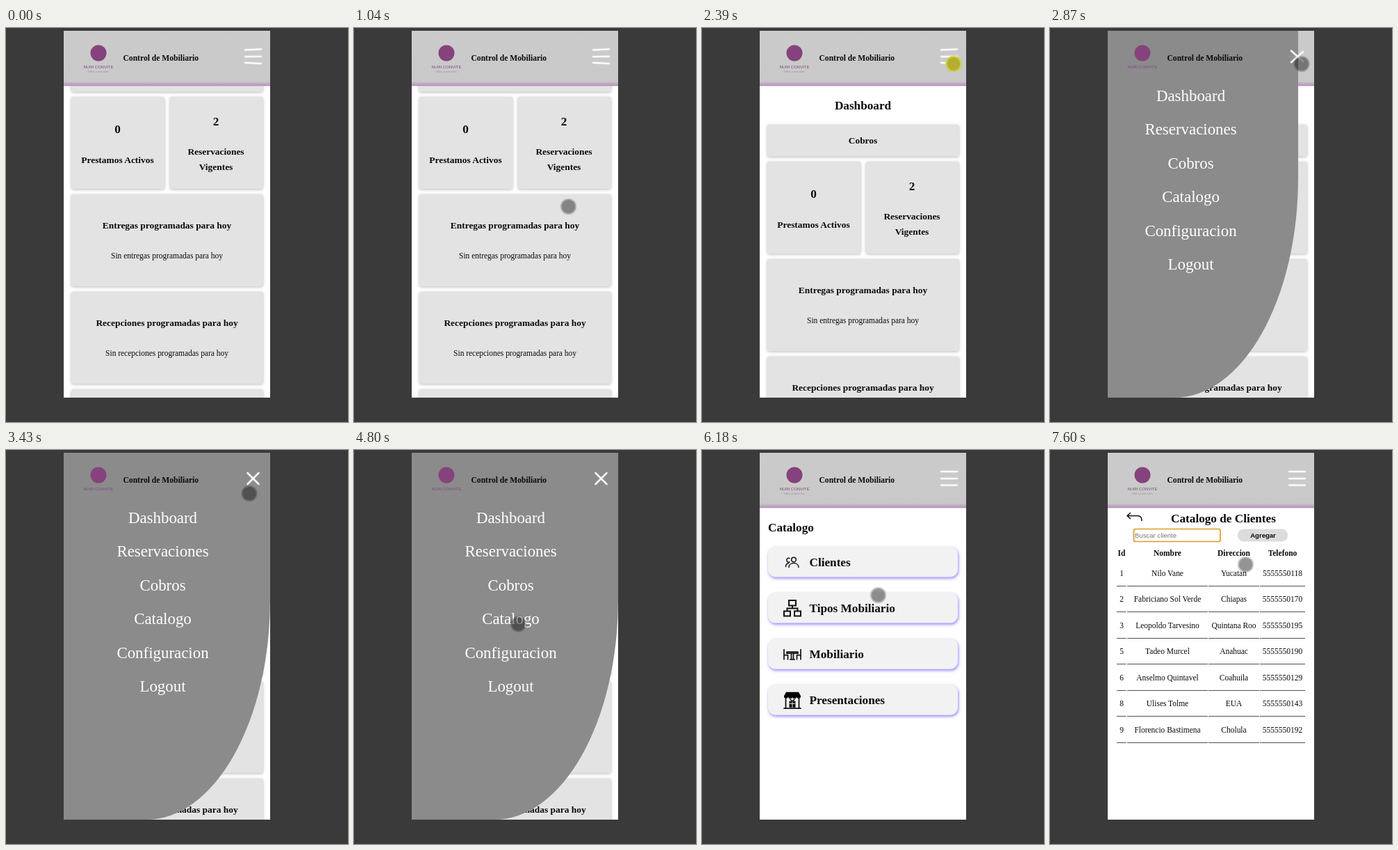
Write an HTML page that moves like this. It is 492 px wide and 566 px high and loops after 8 s.

```html
<!DOCTYPE html>
<html lang="es">
<head>
<meta charset="utf-8">
<title>Control de Mobiliario</title>
<style>
  html, body { margin: 0; width: 100%; height: 100%; overflow: hidden; background: #3a3a3a; }
  svg { display: block; width: 492px; height: 566px; font: 11.46px "Liberation Serif", serif; }
  text { fill: #0a0a0a; text-anchor: middle; }
  .left { text-anchor: start; }
  .b { font-weight: bold; }
  .h2 { font-weight: bold; font-size: 17.2px; }
  .h3 { font-weight: bold; font-size: 13.41px; }
  .link { font-size: 22.9px; fill: #fff; }
  .ui { font-family: "Liberation Sans", sans-serif; font-size: 9.55px; }
  .card { fill: #e3e3e3; filter: drop-shadow(0 1px 2px rgba(0, 0, 0, .28)); }
  .item { fill: #f2f2f2; filter: drop-shadow(1.5px 2px 2px rgba(75, 62, 255, .62)); }
  .line { fill: none; stroke: #111; stroke-width: 1.5; stroke-linecap: round; stroke-linejoin: round; }
  .bar { stroke: #fff; stroke-width: 2.7; stroke-linecap: round; }
</style>
</head>
<body>
<svg viewBox="0 0 492 566">
  <defs>
    <clipPath id="phone"><rect x="83" y="4" width="297" height="527"/></clipPath>
    <linearGradient id="bg" x1="0" y1="0" x2="0" y2="1">
      <stop offset="0" stop-color="#cbcbcb"/>
      <stop offset=".92" stop-color="#c9c9c9"/>
      <stop offset=".965" stop-color="#bda9c0"/>
      <stop offset="1" stop-color="#b592ba"/>
    </linearGradient>
  </defs>
  <rect width="492" height="566" fill="#3a3a3a"/>
  <g clip-path="url(#phone)">
    <rect x="83" y="4" width="297" height="527" fill="#fff"/>
    <g id="dash"><g id="scroll"></g></g>
    <g id="catalog"></g>
    <g id="clients"></g>
    <rect x="83" y="4" width="297" height="79" fill="url(#bg)"/>
    <rect x="83" y="83" width="297" height="1" fill="#b592ba" opacity=".35"/>
    <g id="menu">
      <path d="M83 4H380V215A178 316 0 0 1 202 531H83Z" fill="#8b8b8b"/>
    </g>
    <circle cx="133" cy="36" r="11.5" fill="#86427c"/>
    <text class="ui" x="133" y="58" style="font-size:6px;fill:#7c4a80">NURI CONVITE</text>
    <text class="ui" x="133" y="63.5" style="font-size:4px;fill:#a08aa4">Sillas y manteles</text>
    <text class="b" x="168.5" y="47" style="text-anchor:start;font-size:11.6px">Control de Mobiliario</text>
    <path id="top" class="bar" d="M-11.3 0H11.3"/>
    <path id="mid" class="bar" d="M-11.3 0H11.3"/>
    <path id="low" class="bar" d="M-11.3 0H11.3"/>
  </g>
  <g id="cursor">
    <g id="plain">
      <circle r="11.6" opacity=".22"/>
      <circle r="9.8" opacity=".26"/>
    </g>
    <g id="press">
      <circle r="11.8" fill="#d0cf48" opacity=".95"/>
      <circle r="9.4" fill="#b3b031"/>
    </g>
  </g>
</svg>
<script>
const LOOP = 8000;
const $ = id => document.getElementById(id);
const add = (id, ...parts) => $(id).insertAdjacentHTML('beforeend', parts.join(''));
const text = (cls, x, y, s) => `<text class="${cls}" x="${x}" y="${y}">${s}</text>`;
const rect = (cls, x, y, w, h, r) =>
  `<rect class="${cls}" x="${x}" y="${y}" width="${w}" height="${h}" rx="${r}"/>`;
const card = (x, y, w, h) => rect('card', x, y, w, h, 2);

// Dashboard
add('scroll',
  text('h2', 231.5, 117, 'Dashboard'),
  card(94, 139, 275.5, 45.5), text('h3', 231.5, 166, 'Cobros'),
  card(94, 192, 134, 132), text('h2', 160.5, 243.5, '0'),
  text('h3', 160.5, 286.5, 'Prestamos Activos'),
  card(236, 192, 133.5, 132), text('h2', 302, 232.5, '2'),
  text('h3', 302, 275, 'Reservaciones'), text('h3', 302, 297, 'Vigentes'),
  card(94, 332, 275.5, 132), text('h3', 231.5, 381, 'Entregas programadas para hoy'),
  text('', 231.5, 424, 'Sin entregas programadas para hoy'),
  card(94, 472, 275.5, 132), text('h3', 231.5, 521, 'Recepciones programadas para hoy'),
  text('', 231.5, 563.5, 'Sin recepciones programadas para hoy'),
  card(94, 612, 275.5, 132));

// Menu
['Dashboard', 'Reservaciones', 'Cobros', 'Catalogo', 'Configuracion', 'Logout']
  .forEach((s, i) => add('menu', text('link', 225.5, 105 + 48.4 * i, s)));

// Catalog, icons drawn around their centre
const icons = [
  `<g class="line"><circle cx="2" cy="-4" r="3.3"/><path d="M-5 7C-5-1 9-1 9 7M-4-6A3 3 0 1 0-4-0.5M-9.5 6C-9.5 3-8 1.5-5.5 1.2"/></g>`,
  `<path class="line" style="stroke-width:2;stroke-linecap:butt;stroke-linejoin:miter"
    d="M-5-11.5H5V-4H-5ZM-12 4H-3V11H-12ZM3 4H12V11H3ZM0-4V0M-7.5 4V0H7.5V4"/>`,
  `<path class="line" style="stroke-width:1.7"
    d="M-8-3.5H8V-1.5H-8ZM-1.5-1V7M1.5-1V7M-3 7.2H3M-12-7V7M-12 1H-6.5V7M12-7V7M12 1H6.5V7"/>`,
  `<path d="M-9-12H9L12-6.5A3 3 0 0 1 6-5.5A3 3 0 0 1 0-5.5A3 3 0 0 1-6-5.5A3 3 0 0 1-12-6.5Z"/>
   <path class="line" style="stroke-width:1.8" d="M-9.5-4V11M9.5-4V11M-12 11.3H12"/>
   <path d="M-4.5 1H4.5V10H-4.5Z"/><path d="M0 1V10M-4.5 4.5H4.5" stroke="#f2f2f2"/>
   <path class="line" d="M0 1L-3-1.5M0 1L3-1.5"/>`
];
add('catalog', text('h2 left', 95, 117, 'Catalogo'));
['Clientes', 'Tipos Mobiliario', 'Mobiliario', 'Presentaciones'].forEach((s, i) => {
  const y = 139 + 66.1 * i;
  add('catalog', rect('item', 95, y, 273, 43.5, 11),
    `<g transform="translate(130 ${y + 22.5})">${icons[i]}</g>`,
    text('h2 left', 154.5, y + 28, s));
});

// Client list
const cols = [103, 169, 264.5, 334.5];
const people = [
  [1, 'Nilo Vane', 'Yucatan', '18'],
  [2, 'Fabriciano Sol Verde', 'Chiapas', '70'],
  [3, 'Leopoldo Tarvesino', 'Quintana Roo', '95'],
  [5, 'Tadeo Murcel', 'Anahuac', '90'],
  [6, 'Anselmo Quintavel', 'Coahuila', '29'],
  [8, 'Ulises Tolme', 'EUA', '43'],
  [9, 'Florencio Bastimena', 'Cholula', '92']
];
add('clients',
  `<path class="line" style="stroke-width:1.6" d="M115.5 90.5L111 94.5L115.5 98.5M111.5 94.5H126Q132 94.5 132 101.5"/>`,
  text('h2', 249.5, 104, 'Catalogo de Clientes'),
  `<rect x="120.5" y="113.5" width="124.5" height="18" rx="2.5" fill="#fff" stroke="#dd9a25" stroke-width="1.7"/>`,
  `<text class="ui left" x="122" y="126" style="fill:#757575">Buscar cliente</text>`,
  `<rect id="caret" x="121.6" y="117.5" width="1" height="10.5"/>`,
  `<rect x="270" y="113.5" width="72" height="18" rx="8.5" fill="#dcdcdc"/>`,
  text('ui b', 306.5, 126, 'Agregar'));
['Id', 'Nombre', 'Direccion', 'Telefono'].forEach((s, i) => add('clients', text('b', cols[i], 152, s)));
people.forEach((row, i) => {
  const y = 181 + 37.45 * i, rule = Math.round(195 + 37.45 * i) + .5;
  row.forEach((s, c) => add('clients', text('', cols[c], y, c === 3 ? '55555501' + s : s)));
  add('clients', `<path d="M96 ${rule}H109.5M111 ${rule}H227M228 ${rule}H301M302 ${rule}H367" stroke="#505050"/>`);
});

// Each row: time, value, easing up to the next row
const play = (id, prop, rows) => {
  const last = rows[rows.length - 1];
  $(id).animate([...rows, [LOOP, last[1]]].map(([t, v, easing = 'step-end']) =>
    ({ offset: t / LOOP, [prop]: v, easing })), { duration: LOOP, iterations: Infinity });
};
const at = (x, y, turn = 0) => `translate(${x}px, ${y}px) rotate(${turn}deg)`;
const show = (id, ...spans) => {
  const rows = spans.flatMap(([from, to]) => [[from, 1], [to, 0]]).filter(r => r[0] < LOOP);
  play(id, 'opacity', rows[0][0] ? [[0, 0], ...rows] : rows);
};

const SWAP = 4870, OPEN = [2460, 3080], CLOSE = [SWAP, 5360], LIST = 7070;
show('dash', [0, SWAP]);
show('catalog', [SWAP, LIST]);
show('clients', [LIST, LOOP]);
show('caret', [LIST, 7600]);
show('cursor', [480, LOOP]);
show('press', [2390, 2530], [4730, 4800], [7000, LIST]);
play('plain', 'opacity', [[0, 1], [2390, 0], [2530, 1], [4730, 0], [4800, 1], [7000, 0], [LIST, 1]]);

play('scroll', 'transform', [[0, at(0, -93)], [1110, at(0, -40)], [1180, at(0, 0)]]);

const toggle = (id, prop, shut, open, end = shut) => play(id, prop, [
  [0, shut], [OPEN[0], shut, 'ease'], [OPEN[1], open], [CLOSE[0], open, 'ease'], [CLOSE[1], end]
]);
toggle('menu', 'transform', at(-298, 0), at(0, 0));
toggle('top', 'transform', at(355.5, 31, -3), at(355.5, 41, 45), at(355.5, 31));
toggle('mid', 'transform', at(355.5, 41, -1), at(355.5, 41), at(355.5, 41));
toggle('mid', 'opacity', 1, 0);
toggle('low', 'transform', at(355.5, 50.5, 3), at(355.5, 41, -45), at(355.5, 50.5));

play('cursor', 'transform', [
  [0, at(472, 543)],
  [480, at(472, 543), 'steps(4, end)'],
  [760, at(402, 370), 'steps(4, end)'],
  [1040, at(308.5, 256.5)],
  [1510, at(308.5, 256.5), 'steps(10, start)'],
  [2210, at(362, 51.5)],
  [3430, at(350, 62.5), 'steps(11, end)'],
  [4190, at(244, 231)],
  [4260, at(244, 231), 'steps(3, start)'],
  [4470, at(236.5, 250)],
  [5890, at(240, 242), 'steps(4, end)'],
  [6180, at(253.5, 208.5), 'steps(7, end)'],
  [6670, at(281.5, 164.5)]
]);
</script>
</body>
</html>
```
